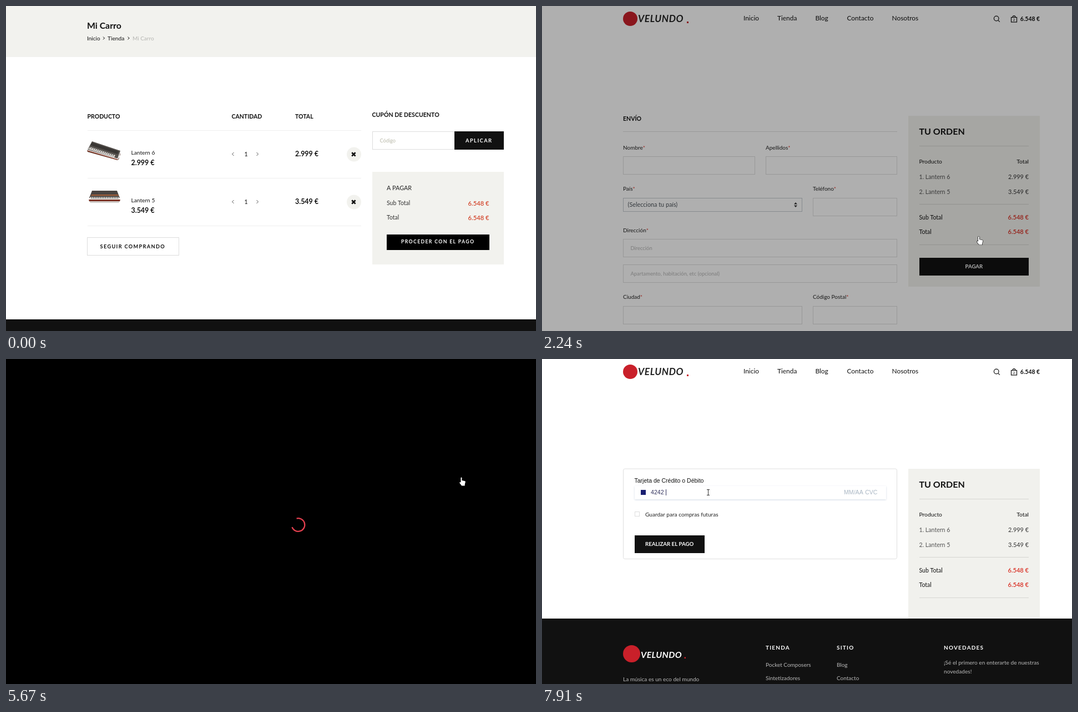
An HTML page with a canvas for the animation above (7.99 s loop, 955 by 586 pixels).

```html
<!DOCTYPE html>
<html lang="es">
<head>
<meta charset="utf-8">
<title>Carro</title>
<style>
html, body { margin: 0; width: 100%; height: 100%; overflow: hidden; background: #fff; }
canvas { display: block; }
</style>
</head>
<body>
<canvas id="stage" width="955" height="586"></canvas>
<script>
const ctx = document.getElementById('stage').getContext('2d');
const W = 955, H = 586, LOOP = 7990;
const SANS = 'Lato, "Open Sans", sans-serif';
const ARIAL = '"Liberation Sans", Arial, sans-serif';
const INK = '#111', RED = '#d93025', PALE = '#f2f2ee', HINT = '#b3b3b3', BRAND = '#c9202a';
const SHOP = 'VELUNDO';
const ITEMS = [['Lantern 6', '2.999 €'], ['Lantern 5', '3.549 €']];
const SUM = '6.548 €';

const clamp = v => Math.max(0, Math.min(1, v));
const swing = v => 0.5 - Math.cos(clamp(v) * Math.PI) / 2;
const lerp = (a, b, k) => a + (b - a) * k;

// y is the middle of the capital letters
function text(str, x, y, size, o = {}) {
  ctx.font = `${o.style || ''} ${o.weight || 400} ${size}px ${o.font || SANS}`;
  ctx.letterSpacing = (o.track || 0) + 'px';
  ctx.textAlign = o.align || 'left';
  ctx.fillStyle = o.color || INK;
  ctx.fillText(str, x, y + size * 0.36);
  return ctx.measureText(str).width;
}
const bold = (str, x, y, size, o) => text(str, x, y, size, { weight: 700, ...o });

function box(x, y, w, h, color) {
  ctx.fillStyle = color;
  ctx.fillRect(x, y, w, h);
}
function frame(x, y, w, h, color = '#ddd') {
  box(x, y, w, h, '#fff');
  ctx.strokeStyle = color;
  ctx.lineWidth = 1;
  ctx.strokeRect(x + 0.5, y + 0.5, w - 1, h - 1);
}
const rule = (x1, x2, y, color = '#ddd') => box(x1, y, x2 - x1, 1, color);

function disc(x, y, r, color) {
  ctx.fillStyle = color;
  ctx.beginPath();
  ctx.arc(x, y, r, 0, 7);
  ctx.fill();
}
function poly(color, ...p) {
  ctx.fillStyle = color;
  ctx.beginPath();
  for (let i = 0; i < p.length; i += 2) ctx.lineTo(p[i], p[i + 1]);
  ctx.fill();
}
function line(color, width, ...p) {
  ctx.strokeStyle = color;
  ctx.lineWidth = width;
  ctx.beginPath();
  for (let i = 0; i < p.length; i += 4) {
    ctx.moveTo(p[i], p[i + 1]);
    ctx.lineTo(p[i + 2], p[i + 3]);
  }
  ctx.stroke();
}

// ---------- shared parts ----------
function header() {
  disc(159, 23, 13, BRAND);
  bold(SHOP, 173, 23, 17.3, { style: 'italic', color: '#222', track: 0.6 });
  box(261, 28, 3, 3, BRAND);
  const nav = [['Inicio', 363], ['Tienda', 424], ['Blog', 492.5], ['Contacto', 549.5], ['Nosotros', 630.5]];
  for (const [s, x] of nav) text(s, x, 22, 11.9);
  ctx.strokeStyle = INK;
  ctx.lineWidth = 1.2;
  ctx.beginPath();
  ctx.arc(818.7, 22.5, 4.3, 0, 7);
  ctx.moveTo(821.8, 25.6);
  ctx.lineTo(824.8, 28.6);
  ctx.stroke();
  ctx.strokeRect(845.5, 20.5, 10, 8.5);
  ctx.beginPath();
  ctx.arc(850.5, 20, 2.4, Math.PI, 0);
  ctx.stroke();
  text('2', 850.5, 24.8, 6.5, { align: 'center' });
  bold(SUM, 897, 23.5, 10.4, { align: 'right' });
}

function order(button) {
  const right = { align: 'right' };
  box(660, 198, 237, 308, '#f1f1ed');
  bold('TU ORDEN', 679.5, 226, 16);
  for (const y of [252, 357, 430]) rule(680, 877, y, '#d6d6d2');
  text('Producto', 679.5, 280, 10.3);
  text('Total', 877, 280, 10.3, right);
  ITEMS.forEach(([name, price], i) => {
    const y = 308.5 + i * 27;
    text(`${i + 1}. ${name}`, 679.5, y, 10.6, { color: '#555' });
    text(price, 877, y, 10.9, { ...right, color: '#333' });
  });
  ['Sub Total', 'Total'].forEach((s, i) => {
    text(s, 679.5, 381 + i * 26.5, 10.5);
    text(SUM, 877, 381 + i * 26.5, 11.1, { ...right, color: RED, weight: 600 });
  });
  if (button) {
    box(680, 454, 197, 32, INK);
    bold('PAGAR', 778.3, 469.5, 9.6, { align: 'center', color: '#fff' });
  }
}

// ---------- cart ----------
function synthTilted() {
  poly('#5a3a30', 146, 260, 203, 277, 206, 264, 206, 268, 201, 278, 147, 263);
  poly('#55504c', 155, 244, 206, 261, 201, 275, 147, 259);
  poly('#393634', 155, 246, 203, 262, 201, 267, 152, 251);
  poly('#d9d5d0', 151, 254, 197, 269, 195, 273, 148, 258);
  for (let i = 0; i < 14; i++) {
    const x = 152 + i * 3.2;
    line('#333', 1, x, 254.5 + i * 1.04, x - 1, 257 + i * 1.04);
  }
  line('#a2452f', 1.2, 147, 261, 201, 277);
}
function synthFlat() {
  poly('#d0cdca', 149, 351, 206, 351, 203, 355, 152, 355);
  poly('#4a4441', 155, 333, 200, 333, 205, 346, 150, 346);
  poly('#a5603a', 154, 340, 202, 340, 203, 342, 153, 342);
  poly('#e4e0db', 152, 344, 203, 344, 204, 349, 151, 349);
  for (let i = 0; i < 16; i++) box(154 + i * 3.1, 344, 1.2, 3, '#333');
  poly('#7d3326', 149, 349, 206, 349, 205, 352, 150, 352);
}

function cart() {
  box(0, 0, W, 92, PALE);
  bold('Mi Carro', 146, 35.5, 15.8);
  text('Inicio', 146, 58, 10);
  text('Tienda', 183, 58, 10.2);
  text('Mi Carro', 228, 58, 10, { color: '#b5b5b2' });
  for (const x of [175, 219.5]) {
    line(INK, 1, x, 55.5, x + 2.6, 58.2, x + 2.6, 57.8, x, 60.5);
  }
  bold('PRODUCTO', 146.5, 199, 10.5);
  bold('CANTIDAD', 406.5, 199, 10.5);
  bold('TOTAL', 521, 199, 10.5);
  bold('CUPÓN DE DESCUENTO', 659.5, 196.5, 10.6);
  for (const y of [224, 310, 396]) rule(147, 640, y, '#efefef');
  synthTilted();
  synthFlat();
  ITEMS.forEach(([name, price], i) => {
    const y = 267 + i * 86;
    text(name, 225.5, y - 3, 10.2);
    bold(price, 225.5, y + 16, 12.4);
    line('#555', 1, 410.5, y - 3, 407.5, y, 407.5, y, 410.5, y + 3,
      451.5, y - 3, 454.5, y, 454.5, y, 451.5, y + 3);
    text('1', 432.5, y, 10.5, { align: 'center' });
    bold(price, 521, y - 0.5, 12.4);
    disc(627, y + 0.5, 13, PALE);
    line(INK, 2.7, 623.2, y - 2.8, 629.6, y + 3.6, 629.6, y - 2.8, 623.2, y + 3.6);
  });
  frame(146, 417, 166, 33);
  bold('SEGUIR COMPRANDO', 169.5, 433.5, 9.2, { track: 1.35 });

  frame(660, 226, 149, 33);
  text('Código', 673.5, 243, 9.2, { color: '#b8b8a8' });
  box(808, 226, 89, 33, INK);
  bold('APLICAR', 828, 243, 9.4, { track: 1.4, color: '#fff' });

  box(660, 299, 237, 167, PALE);
  text('A PAGAR', 686, 328, 10.8, { color: '#222' });
  ['Sub Total', 'Total'].forEach((s, i) => {
    text(s, 686, 355.5 + i * 26, 10.5, { color: '#333' });
    text(SUM, 870.5, 355.5 + i * 26, 11.2, { align: 'right', color: '#d3452b', weight: 600 });
  });
  box(686, 412, 185, 28, '#000');
  bold('PROCEDER CON EL PAGO', 712, 425, 8.8, { track: 1.3, color: '#fff' });
  box(0, 565, W, 21, INK);
}

// ---------- checkout ----------
function label(str, x, y) {
  const w = text(str, x, y, 10, { color: '#222' });
  text('*', x + w, y, 10, { color: RED });
}
function field(x, y, w, hint) {
  frame(x, y, w, 33);
  text(hint, x + 13.5, y + 16.5, 9.4, { color: HINT });
}
function flag(x, y) {
  box(x, y, 11, 8, '#fff');
  box(x, y, 11, 2.4, '#0a7a52');
  box(x, y + 2.8, 11, 2.4, '#111');
  box(x, y + 5.6, 11, 2.4, '#f0c52c');
  poly('#cc2a2a', x, y, x + 5, y + 4, x, y + 8);
  box(x + 1.2, y + 3.2, 1.6, 1.6, '#f0d040');
}
function addressForm(title, y, filled) {
  const pick = (full, empty = '') => filled ? full : empty;
  bold(title, 146, y, 10.5);
  rule(146, 640, y + 23);
  label('Nombre', 146, y + 52);
  field(146, y + 68, 238, pick('Gordon'));
  label('Apellidos', 403, y + 52);
  field(403, y + 68, 237, pick('Thayer'));
  label('País', 146, y + 126);
  frame(146, y + 143, 323, 25, '#c5cad0');
  text(pick('Mozambique', '(Selecciona tu país)'), 154.5, y + 155, 10.8, { color: '#495057' });
  poly('#333', 454, y + 154.5, 457, y + 151, 460, y + 154.5);
  poly('#333', 454, y + 156.5, 457, y + 160, 460, y + 156.5);
  if (filled) flag(149, y + 174.5);
  label('Teléfono', 488, y + 126);
  field(488, y + 143, 152, pick('+1 (555) 010-4827'));
  label('Dirección', 146, y + 201);
  field(146, y + 217, 494, pick('Perferendis autem id', 'Dirección'));
  field(146, y + 263, 494, pick('Voluptas minima sit', 'Apartamento, habitación, etc (opcional)'));
  label('Ciudad', 146, y + 321);
  field(146, y + 338, 323, pick('Dolores non dolores'));
  label('Código Postal', 488, y + 321);
  field(488, y + 338, 152, pick('22048'));
}
function checkout(t) {
  const scroll = t < 2710 ? 0 : lerp(66, 264, swing((t - 3560) / 850));
  const filled = t >= 3170;
  ctx.save();
  ctx.translate(0, -Math.round(scroll));
  header();
  addressForm('ENVÍO', 203, filled);
  addressForm('FACTURACIÓN', 596, filled);
  order(true);
  ctx.restore();
}

// ---------- payment ----------
function footer() {
  box(0, 468, W, H - 468, INK);
  disc(161.5, 531.5, 15.5, BRAND);
  bold(SHOP, 178, 533, 15.8, { style: 'italic', color: '#fff', track: 0.4 });
  box(256.5, 537.5, 2.5, 2.5, BRAND);
  const cols = [['TIENDA', 403, 'Pocket Composers', 'Sintetizadores'], ['SITIO', 531, 'Blog', 'Contacto']];
  const grey = { color: '#b9b9b9' };
  for (const [title, x, a, b] of cols) {
    bold(title, x, 520, 10, { track: 1.2, color: '#fff' });
    text(a, x, 551, 10, grey);
    text(b, x, 575, 10, grey);
  }
  bold('NOVEDADES', 724, 520, 10, { track: 1.2, color: '#fff' });
  text('¡Sé el primero en enterarte de nuestras', 724, 547, 10.1, grey);
  text('novedades!', 724, 563.5, 10.1, grey);
  text('La música es un eco del mundo', 146, 577, 10.1, grey);
}
function payment(t) {
  header();
  ctx.strokeStyle = '#dfdfdf';
  ctx.lineWidth = 1;
  ctx.beginPath();
  ctx.roundRect(146.5, 198, 493, 162.5, 3);
  ctx.stroke();
  text('Tarjeta de Crédito o Débito', 166.5, 219, 10.5, { font: ARIAL });

  ctx.save();
  ctx.shadowColor = '#d3dbe4';
  ctx.shadowBlur = 3;
  ctx.shadowOffsetY = 1;
  box(167, 229, 453, 24, '#fff');
  ctx.restore();
  const grey = { font: ARIAL, color: '#aab7c4' };
  const typed = t < 7450 ? 0 : Math.min(4, 1 + Math.floor((t - 7450) / 153));
  if (typed) {
    box(178, 236, 9, 9, '#1a1f71');
    const w = text('4242'.slice(0, typed) + (typed > 3 ? ' ' : ''), 196, 240.5, 10.6, { font: ARIAL, color: '#32325d' });
    box(196 + Math.round(w), 235, 1, 11, '#32325d');
  } else {
    box(176, 236, 13, 9, '#b7c2cd');
    box(178, 238, 4, 3, '#e8edf2');
    box(184, 238, 3, 1, '#e8edf2');
    box(178, 242, 9, 1, '#e8edf2');
    text('Número de tarjeta', 196, 240.5, 10.6, grey);
  }
  text('MM/AA', 544, 240.5, 10.6, grey);
  text('CVC', 604.5, 240.5, 10.6, { ...grey, align: 'right' });

  frame(167, 275, 9, 9, '#ddd');
  text('Guardar para compras futuras', 186, 280.5, 10.1, { color: '#222' });
  box(167, 318, 126, 32, INK);
  bold('REALIZAR EL PAGO', 186, 334, 9.7, { color: '#fff' });
  order(false);
  footer();
}

// ---------- overlay and pointer ----------
function loader(t, ready, angle) {
  const cover = 1 - swing((t - ready - 350) / 500);
  if (cover > 0) box(0, 0, W, H, `rgba(0,0,0,${cover})`);
  const alpha = 1 - swing((t - ready) / 400);
  if (alpha <= 0) return;
  const a = angle * Math.PI / 180 + (t - ready) / 750 * Math.PI * 2;
  ctx.globalAlpha = alpha;
  ctx.strokeStyle = '#e5404f';
  ctx.lineWidth = 2.3;
  ctx.beginPath();
  ctx.arc(526.5, 299, 11.8, a, a + 4.6);
  ctx.stroke();
  ctx.globalAlpha = 1;
}

const ARROW = new Path2D('M0 0V11.5L2.7 9L4.5 13L6.4 12.2L4.6 8.3H8.2Z');
const HAND = new Path2D('M3 1.5C3 .2 5 .2 5 1.5V6L10 7C11 7.2 11.4 7.8 11.3 8.8L10.2 13.2V15.4H4.6L1 10.8C.2 9.3 1.6 8.2 3 9.6Z');

function pointer(kind, x, y) {
  if (kind === 'beam') {
    line('#333', 1, x, y - 4.5, x, y + 4.5, x - 2.5, y - 5, x + 2.5, y - 5, x - 2.5, y + 5, x + 2.5, y + 5);
    return;
  }
  const shape = kind === 'hand' ? HAND : ARROW;
  ctx.save();
  ctx.translate(kind === 'hand' ? x - 4 : x, y);
  ctx.lineJoin = 'round';
  ctx.lineWidth = 1.2;
  ctx.strokeStyle = '#000';
  ctx.fillStyle = '#fff';
  ctx.stroke(shape);
  ctx.fill(shape);
  ctx.restore();
}
const ring = (x, y) => disc(x, y, 10, 'rgba(170,170,170,.4)');

function mouse(t) {
  if (t >= 540 && t < 2710) {
    const k = swing((t - 500) / 430);
    const x = lerp(914, 787, k), y = lerp(468, 415, k);
    if (t >= 1160 && t < 1240) ring(x, y);
    pointer(x < 870 && y < 440 ? 'hand' : 'arrow', x, y);
  } else if (t >= 4490 && t < 5670) {
    const k = swing((t - 4600) / 480);
    const x = lerp(842, 820.5, k), y = lerp(243, 213, k);
    if (t >= 5140 && t < 5290) ring(x, y);
    const busy = t >= 5290 && t < 5510;
    pointer(y < 222 && !busy ? 'hand' : 'arrow', x, y);
  } else if (t >= 5670) {
    const a = swing((t - 5750) / 540), b = swing((t - 6450) / 650);
    const x = lerp(lerp(820.5, 534.5, a), 299.5, b), y = lerp(lerp(213, 164.5, a), 240.5, b);
    if (t >= 7130 && t < 7280) ring(x, y);
    pointer(a === 0 ? 'hand' : y > 229 && x < 620 ? 'beam' : 'arrow', x, y);
  }
}

function draw() {
  const t = performance.now() % LOOP;
  box(0, 0, W, H, '#fff');
  if (t < 1620) {
    cart();
  } else if (t < 5670) {
    checkout(t);
    loader(t, 1580, -116);
  } else {
    payment(t);
    loader(t, 5740, -71);
  }
  mouse(t);
  requestAnimationFrame(draw);
}
draw();
</script>
</body>
</html>
```
